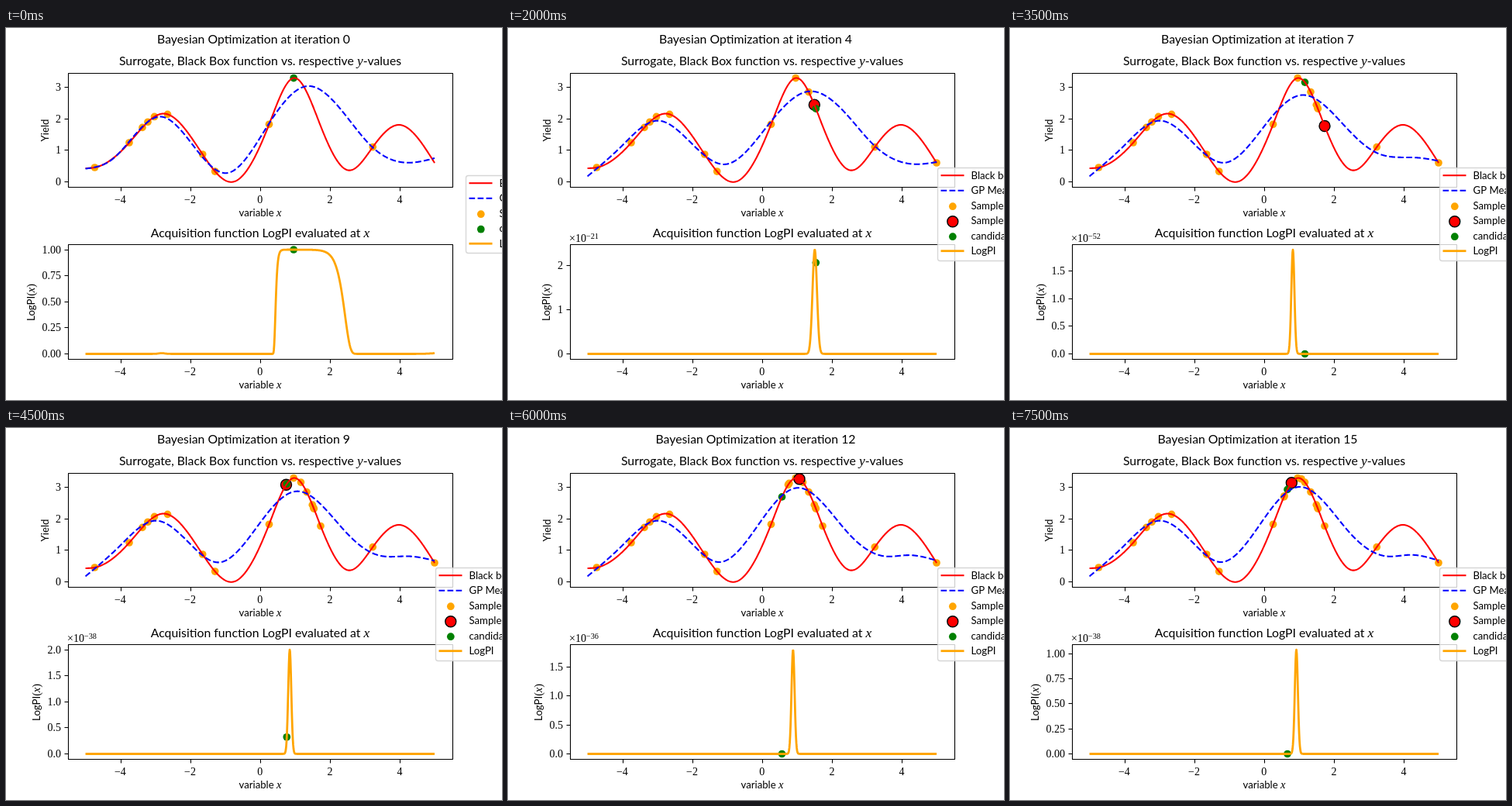
An HTML page with a canvas for the animation above (8000 ms loop, 640 px wide and 480 px high).

```html
<!DOCTYPE html>
<html lang="en">
<head>
<meta charset="utf-8">
<title>Bayesian Optimization</title>
<style>
  html, body { margin: 0; width: 100%; height: 100%; overflow: hidden; background: #fff; }
  canvas { display: block; width: 640px; height: 480px; }
</style>
</head>
<body>
<canvas id="stage" width="640" height="480"></canvas>
<script>
const ctx = document.getElementById("stage").getContext("2d");
const STEP = 500, COUNT = 16;
const MID = 328, UNIT = 45.09, X0 = MID - 5 * UNIT, X1 = MID + 5 * UNIT;
const BASE = 420.5, HEIGHT = 134.5;

const sans = s => s + "px Lato, 'Open Sans', sans-serif";
const serif = s => s + "px 'Liberation Serif', 'Noto Serif', serif";
const italic = s => "italic " + serif(s);
const TITLE = 15.8, LABEL = 13.2, NUM = 14;

// Natural cubic spline through x, y, x, y, ...
function spline(...pts) {
  const x = pts.filter((_, i) => i % 2 === 0), y = pts.filter((_, i) => i % 2);
  const n = x.length, m = Array(n).fill(0), u = Array(n).fill(0);
  for (let i = 1; i < n - 1; i++) {
    const s = (x[i] - x[i - 1]) / (x[i + 1] - x[i - 1]);
    const p = s * m[i - 1] + 2;
    const d = (y[i + 1] - y[i]) / (x[i + 1] - x[i]) - (y[i] - y[i - 1]) / (x[i] - x[i - 1]);
    m[i] = (s - 1) / p;
    u[i] = (6 * d / (x[i + 1] - x[i - 1]) - s * u[i - 1]) / p;
  }
  m[n - 1] = 0;
  for (let i = n - 2; i >= 0; i--) m[i] = m[i] * m[i + 1] + u[i];
  return v => {
    let i = 0;
    while (i < n - 2 && v > x[i + 1]) i++;
    const h = x[i + 1] - x[i], a = (x[i + 1] - v) / h, b = 1 - a;
    return a * y[i] + b * y[i + 1] + ((a ** 3 - a) * m[i] + (b ** 3 - b) * m[i + 1]) * h * h / 6;
  };
}

const blackBox = spline(103, 181, 114.5, 180, 159, 148, 203.5, 110.5, 253.7, 163, 292.4, 198.6,
  339.5, 124.3, 371.4, 64.5, 406.2, 127, 442, 183.6, 473, 154, 507, 125, 553, 174);

// Surrogate mean at a few iterations; the steps between ease from one to the next
const early = [103, 181.5, 135, 171, 159, 146.5, 199, 114.4, 253, 166, 286, 187, 339.5, 123];
const late = [103, 191, 145, 154, 193, 119.6, 238, 150];
const means = [
  [0, spline(...early, 389, 75, 440, 115, 473, 154, 519, 173.8, 553, 168)],
  [2, spline(...early, 382, 73.7, 440, 124, 473, 153, 490, 158, 553, 140)],
  [4, spline(...late, 281, 175.8, 335, 126, 388, 81.8, 440, 115, 473, 152, 525, 175.7, 553, 173)],
  [7, spline(...late, 277, 173.8, 335, 118, 377, 86.5, 440, 135, 473, 161, 525, 167.3, 553, 171.5)],
  [15, spline(...late, 272, 173, 335, 107, 373, 76, 440, 137, 486, 165.5, 517, 163.7, 553, 171)]
];

function meanAt(k) {
  const i = means.findIndex(([end]) => end >= k) || 1;
  const [a, from] = means[i - 1], [b, to] = means[i];
  const t = 1 - (1 - (k - a) / (b - a)) ** 2.2;
  return x => from(x) + (to(x) - from(x)) * t;
}

const samples = [114.5, 159, 176, 183, 191.5, 208.5, 253.7, 269.7, 339.5, 473.3];
const picks = [371.2, 388, 553, 395.3, 397.3, 396.8, 406, 380.5, 361.5, 362.3, 362.8, 376, 353.5, 354, 363.3, 358];

// Highest acquisition value per iteration
const tops = [1.002, 0.19, 0.0034, 0.0036, 2.37e-21, 2.8e-47, 3.4e-50, 1.89e-52,
  3e-41, 2e-38, 2.7e-37, 3.2e-36, 1.8e-36, 2.6e-37, 1.87e-37, 1.042e-38];

const bell = (c, w) => x => Math.exp(-0.5 * ((x - c) / w) ** 2);
const plateau = x => Math.exp(-Math.exp((347.5 - x) / 1.6) - Math.exp((x - 437.5) / 6.7))
  + 0.007 * (bell(201, 4)(x) + bell(558, 10)(x));
const edge = x => Math.max(0, (x - 520) / 33) ** 4.4 + 0.013 * bell(388.5, 4)(x);

function acquisition(k) {
  const first = [plateau, bell(388, 8), edge, bell(395.3, 4), bell(395.8, 2.9)];
  return first[k] || bell(365 + (k - 7) * 0.56, 2);
}

function niceStep(top) {
  const unit = 10 ** Math.floor(Math.log10(top) - 1);
  return unit * [1, 2, 2.5, 5, 10, 20, 25].find(s => top / (s * unit) < 4.4);
}

function runs(parts, x, y, align = 0.5) {
  const widths = parts.map(([s, f]) => { ctx.font = f; return ctx.measureText(s).width; });
  x -= align * widths.reduce((a, b) => a + b);
  parts.forEach(([s, f, up = 0], i) => {
    ctx.font = f;
    ctx.fillText(s, x, y - up);
    x += widths[i];
  });
}

function upright(parts, x, y) {
  ctx.save();
  ctx.translate(x, y);
  ctx.rotate(-Math.PI / 2);
  runs(parts, 0, 0);
  ctx.restore();
}

function dot(x, y, color, r = 4.85) {
  ctx.beginPath();
  ctx.arc(x, y, r, 0, 7);
  ctx.fillStyle = color;
  ctx.fill();
}

function bigDot(x, y) {
  dot(x, y, "#f00", 7);
  pen("#000", 1.4);
  ctx.stroke();
}

function pen(color, width, dash = []) {
  ctx.strokeStyle = color;
  ctx.lineWidth = width;
  ctx.setLineDash(dash);
}
const redPen = () => pen("#f00", 2.08);
const bluePen = () => pen("#00f", 2.08, [7.7, 3.33]);
const orangePen = () => pen("orange", 2.78);

function plot(f) {
  ctx.lineJoin = "round";
  ctx.beginPath();
  for (let x = X0; x <= X1; x += 0.5) ctx.lineTo(x, f(x));
  ctx.stroke();
}

function line(x1, y1, x2, y2) {
  ctx.beginPath();
  ctx.moveTo(x1, y1);
  ctx.lineTo(x2, y2);
  ctx.stroke();
}

const snap = v => Math.floor(v) + 0.5;

function axes(top, zero, step, decimals, gap) {
  const bottom = top + (top < 100 ? 147 : 148);
  pen("#000", 1.1);
  ctx.fillStyle = "#000";
  ctx.strokeRect(80.5, top, 496, bottom - top);
  for (let v = -4; v <= 4; v += 2) {
    const x = MID + v * UNIT;
    line(snap(x + 0.4), bottom, snap(x + 0.4), bottom + 5);
    runs([[String(v).replace("-", "\u2212"), serif(NUM)]], x - 0.3, bottom + 20);
  }
  for (let i = 0; zero - i * gap > top; i++) {
    const y = snap(zero - i * gap);
    line(75.5, y, 80.5, y);
    runs([[(i * step).toFixed(decimals), serif(NUM)]], 71, y + 4.7, 1);
  }
  runs([["variable ", sans(LABEL)], ["x", italic(14.5)]], MID, bottom + 37.5);
}

function legend(k) {
  const x = k ? 554.5 : 593.5, top = k ? 180.5 : 190.5, h = k ? 120 : 100;
  ctx.beginPath();
  ctx.roundRect(x, top, 140, h, 3);
  ctx.fillStyle = "rgba(255,255,255,0.8)";
  ctx.fill();
  pen("rgba(204,204,204,0.8)", 1.3);
  ctx.stroke();

  const stroke = set => y => { set(); line(x + 4, y, x + 34, y); };
  const mark = (draw, color) => y => draw(x + 19.3, y + 1, color);
  const rows = [
    ["Black box function", stroke(redPen)],
    ["GP Mean", stroke(bluePen)],
    ["Samples", mark(dot, "orange")],
    ["Sampled point", mark(bigDot)],
    ["candidate", mark(dot, "green")],
    ["LogPI", stroke(orangePen)]
  ];
  if (!k) rows.splice(3, 1);
  rows.forEach(([name, draw], i) => {
    const y = top + 9.7 + i * 19.5;
    draw(y);
    ctx.fillStyle = "#000";
    runs([[name, sans(LABEL)]], x + 43, y + 4.6, 0);
  });
}

function drawFunctions(k) {
  const last = picks[k - 1];
  for (const x of samples.concat(picks.slice(0, k))) dot(x, blackBox(x), "orange");
  if (k) bigDot(last, blackBox(last));
  dot(picks[k], blackBox(picks[k]), "green");
  redPen();
  plot(blackBox);
  bluePen();
  plot(meanAt(k));
  axes(58.5, 198.6, 1, 0, 40.8);
  upright([["Yield", sans(LABEL)]], 55, 132);
}

function drawAcquisition(k) {
  const f = acquisition(k), y = x => BASE - HEIGHT * Math.min(1, f(x));
  const exp = tops[k] < 1e-4 ? Math.floor(Math.log10(tops[k])) : 0;
  const top = tops[k] / 10 ** exp, step = niceStep(top);
  const decimals = [0, 1, 2, 3].find(d => Math.abs(step - step.toFixed(d)) < 1e-6);

  dot(picks[k], y(picks[k]), "green");
  orangePen();
  plot(y);
  axes(279.5, BASE, step, decimals, HEIGHT * step / top);
  const width = decimals ? 3.5 + 7 * (decimals + 1) : 7;
  upright([["LogPI", sans(LABEL)], ["(", serif(NUM)], ["x", italic(14.5)], [")", serif(NUM)]], 61 - width, 354);
  if (exp) runs([["\u00d710", serif(NUM)], ["\u2212" + -exp, serif(10.2), 4.5]], 79, 276, 0);
}

function draw(k) {
  const big = sans(TITLE), math = italic(17.5);
  ctx.fillStyle = "#fff";
  ctx.fillRect(0, 0, 640, 480);
  drawFunctions(k);
  drawAcquisition(k);
  runs([["Bayesian Optimization at iteration " + k, big]], 319.5, 19.8);
  runs([["Surrogate, Black Box function vs. respective ", big], ["y", math], ["-values", big]], MID, 47.7);
  runs([["Acquisition function LogPI evaluated at ", big], ["x", math]], MID, 269.7);
  legend(k);
}

let shown = -1;
const start = performance.now();
function tick() {
  const k = Math.floor((performance.now() - start) / STEP) % COUNT;
  if (k !== shown) draw(shown = k);
  requestAnimationFrame(tick);
}
tick();
</script>
</body>
</html>
```
